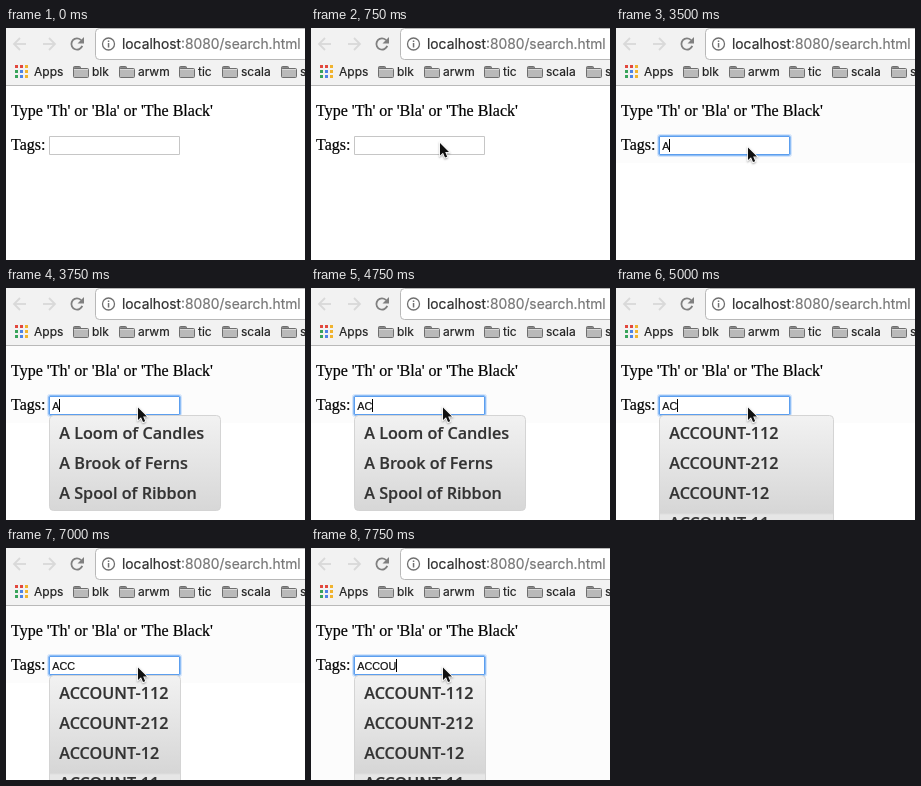
Recreate the animation shown at these times as an HTML page with a canvas. Size 299 by 232 pixels, loop 8 s.

```html
<!DOCTYPE html>
<html lang="en">
<head>
<meta charset="utf-8">
<title>Tag search</title>
<style>
html, body { margin: 0; width: 100%; height: 100%; overflow: hidden; background: #fff; }
canvas { display: block; width: 299px; height: 232px; }
</style>
</head>
<body>
<canvas id="stage" width="299" height="232"></canvas>
<script>
const ctx = document.getElementById('stage').getContext('2d');
const LOOP = 8000;
const UI = 'Inter, Roboto, sans-serif';
const SERIF = '16px "Liberation Serif", serif';
const INPUT = '10.8px "Liberation Sans", sans-serif';
const MENU = '600 16.2px "Open Sans", "Noto Sans", sans-serif';

const books = ['A Loom of Candles', 'A Brook of Ferns', 'A Spool of Ribbon'];
const accounts = ['ACCOUNT-112', 'ACCOUNT-212', 'ACCOUNT-12', 'ACCOUNT-11'];

// Each track holds [start time, ...values]
const pointer = [[500, 167, 68], [750, 128, 114], [1000, 128, 118], [1750, 131, 118.5]];
const field = [
  [2000, '', true], [2500, '', false], [3000, '', true],
  [3500, 'A', true], [4250, 'A', false],
  [4750, 'AC', true], [5500, 'AC', false], [6000, 'AC', true],
  [6250, 'ACC', true], [7000, 'ACC', false], [7500, 'ACC', true],
  [7750, 'ACCOU', true]
];
const menus = [
  [3750, books, 171.5, 96],
  [5000, accounts, 174.5, 140],
  [6500, accounts, 131.5, 140]
];

const at = (track, t) => track.findLast(step => step[0] <= t);

function rect(x, y, w, h, color) {
  ctx.fillStyle = color;
  ctx.fillRect(x, y, w, h);
}

// A hairline stroke gives the slightly heavy look of smoothed screen type
function text(str, x, y, font, color) {
  ctx.font = font;
  ctx.fillStyle = ctx.strokeStyle = color;
  ctx.lineWidth = .2;
  ctx.fillText(str, x, y);
  ctx.strokeText(str, x, y);
  return ctx.measureText(str).width;
}

function box(x, y, w, h, r, fill, stroke, width = 1) {
  ctx.beginPath();
  ctx.roundRect(x, y, w, h, r);
  if (fill) { ctx.fillStyle = fill; ctx.fill(); }
  if (stroke) { ctx.strokeStyle = stroke; ctx.lineWidth = width; ctx.stroke(); }
}

function line(points, color, width) {
  ctx.beginPath();
  points.forEach(([x, y]) => ctx.lineTo(x, y));
  ctx.strokeStyle = color;
  ctx.lineWidth = width;
  ctx.stroke();
}

function arrow(x, dir) {
  line([[x - 6 * dir, 16], [x + 6 * dir, 16]], '#d9d9d9', 1.8);
  line([[x, 10], [x + 6 * dir, 16], [x, 22]], '#d9d9d9', 1.8);
}

function reload() {
  ctx.beginPath();
  ctx.arc(71, 16, 5.6, 0.35, -0.75, false);
  ctx.strokeStyle = '#808080';
  ctx.lineWidth = 1.8;
  ctx.stroke();
  ctx.beginPath();
  ctx.moveTo(78, 9);
  ctx.lineTo(78, 15.5);
  ctx.lineTo(71.5, 15.5);
  ctx.fillStyle = '#808080';
  ctx.fill();
}

function folder(x) {
  box(x + .5, 38.5, 7, 4, 1, '#8c8c8c', '#6e6e6e');
  box(x + .5, 40.5, 15, 9, 1, '#b9b9b9', '#6e6e6e');
  rect(x + 1, 41, 14, 1, '#d8d8d8');
}

function browser() {
  rect(0, 0, 299, 58, '#f2f2f2');
  rect(0, 57, 299, 1, '#b9b9b9');
  arrow(14, -1);
  arrow(43, 1);
  reload();
  box(89.5, .5, 230, 31, 4, '#fff', '#b8b8b8');

  ctx.beginPath();
  ctx.arc(102.5, 16, 6, 0, 7);
  ctx.strokeStyle = '#707070';
  ctx.lineWidth = 1.3;
  ctx.stroke();
  rect(101.8, 12.5, 1.5, 1.5, '#707070');
  rect(101.8, 15, 1.5, 4.5, '#707070');

  const url = '13.8px ' + UI;
  const host = text('localhost', 116, 21, url, '#303030');
  text(':8080/search.html', 116 + host, 21, url, '#777');

  const dots = ['#e2483d', '#e2483d', '#f0b32e', '#38a35a', '#4c83e6', '#f0b32e', '#38a35a', '#4c83e6', '#f0b32e'];
  dots.forEach((c, i) => rect(9 + i % 3 * 5, 37 + (i / 3 | 0) * 5, 3, 3, c));

  const label = '12px ' + UI;
  text('Apps', 28, 48, label, '#222');
  [['blk', 67], ['arwm', 113], ['tic', 173], ['scala', 216], ['s', 275]].forEach(([name, x]) => {
    folder(x);
    text(name, x + 19, 48, label, '#222');
  });
}

function input(state) {
  if (!state) {
    box(43.5, 108.5, 130, 18, 0, '#fff', '#c6c6c6');
    return;
  }
  box(43.5, 108.5, 130, 18, 0, '#fff');
  ['#5c9eee', '#8fbef5', '#d4e5fb'].forEach((glow, i) =>
    box(43.5 - i, 108.5 - i, 130 + 2 * i, 18 + 2 * i, i, null, glow));
  const [, value, caret] = state;
  const w = text(value, 46.3, 122, INPUT, '#111');
  if (caret) rect(Math.floor(46.3 + w), 111, 1, 13, '#000');
}

function menu([, items, w, h]) {
  const shade = ctx.createLinearGradient(0, 127, 0, 227);
  shade.addColorStop(0, '#f2f2f2');
  shade.addColorStop(.98, '#d6d6d6');
  shade.addColorStop(1, '#e6e6e6');
  box(43.5, 127.5, w - .5, h - 1, 4, shade, '#d4d4d4');
  items.forEach((item, i) => text(item, 53.3, 151 + i * 30, MENU, '#333'));
}

function cursor([, x, y]) {
  const shape = [[1, 1], [1, 13.5], [4, 10.8], [6, 15.6], [8.2, 14.7], [6.2, 10], [10, 10]];
  ctx.beginPath();
  shape.forEach(([dx, dy]) => ctx.lineTo(x + dx, y + dy));
  ctx.closePath();
  ctx.save();
  ctx.shadowColor = 'rgba(0, 0, 0, .35)';
  ctx.shadowBlur = 2;
  ctx.shadowOffsetY = 1;
  ctx.strokeStyle = '#fff';
  ctx.lineWidth = 1.6;
  ctx.stroke();
  ctx.restore();
  ctx.fillStyle = '#111';
  ctx.fill();
}

function draw(t) {
  rect(0, 0, 299, 232, '#fff');
  if (t >= 1000) rect(0, 0, 299, t < 7500 ? 135 : 232, '#fcfcfc');
  browser();
  text("Type 'Th' or 'Bla' or 'The Black'", 5, 88, SERIF, '#000');
  text('Tags:', 5, 122, SERIF, '#000');
  input(at(field, t));
  const list = at(menus, t);
  if (list) menu(list);
  const spot = at(pointer, t);
  if (spot) cursor(spot);
}

const start = performance.now();
function tick() {
  draw((performance.now() - start) % LOOP);
  requestAnimationFrame(tick);
}
tick();
</script>
</body>
</html>
```
